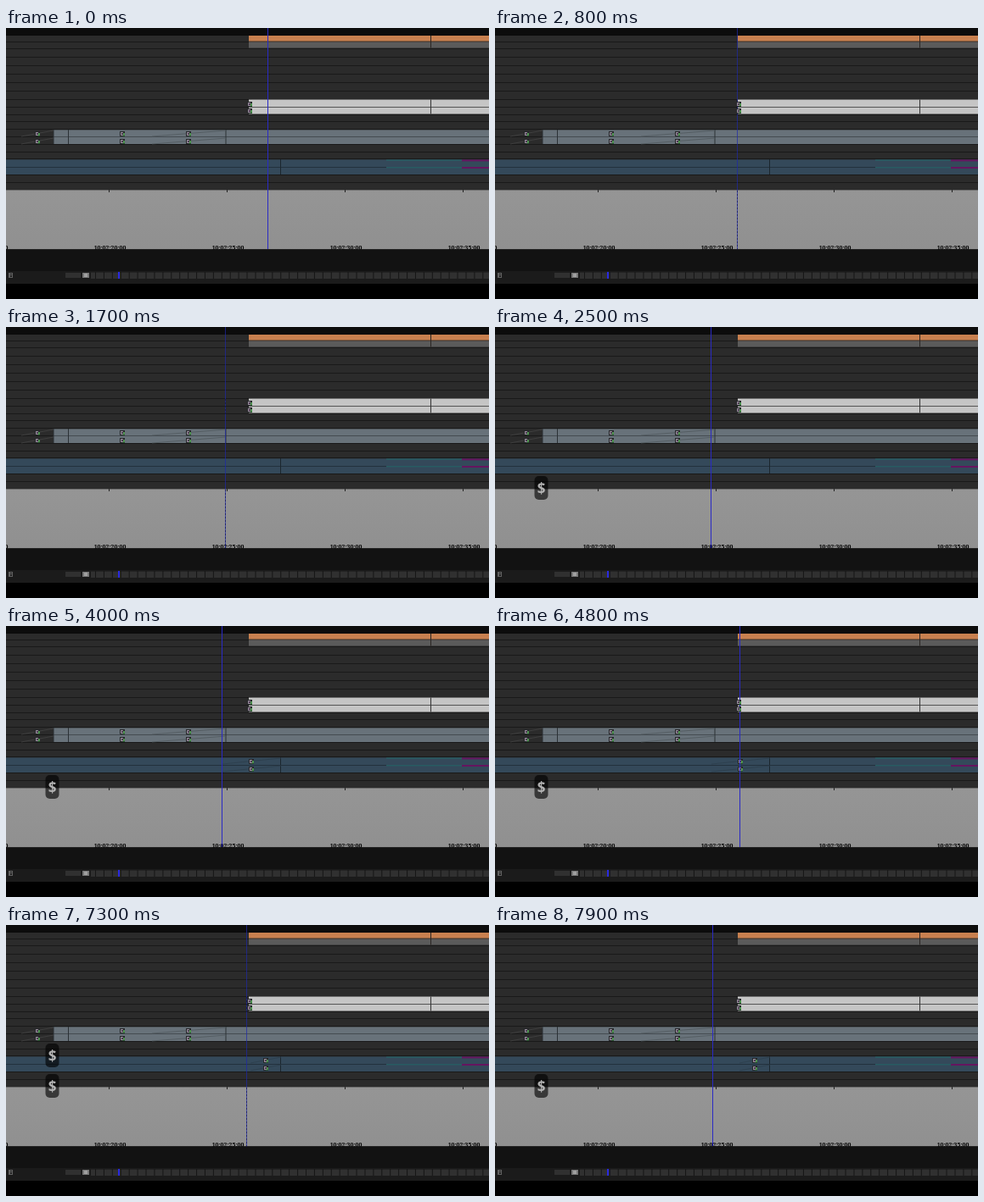
Animation, 569 px wide and 320 px high, one loop 8000 ms. Source, as an HTML page with a canvas:

```html
<!DOCTYPE html>
<html lang="en">
<head>
<meta charset="utf-8">
<title>Timeline</title>
<style>
html, body { margin: 0; width: 100%; height: 100%; overflow: hidden; background: #000; }
canvas { display: block; width: 569px; height: 320px; }
</style>
</head>
<body>
<canvas id="stage" width="569" height="320"></canvas>
<script>
const LOOP = 8000, W = 569, CUT = 324;
const ctx = document.getElementById('stage').getContext('2d');

function box(x, y, w, h, color) {
  ctx.fillStyle = color;
  ctx.fillRect(x, y, w, h);
}

const hline = (y, color, x = 0, w = W) => box(x, y, w, 1, color);
const vline = (x, y, h, color) => box(x, y, 1, h, color);
const clamp = v => Math.max(0, Math.min(1, v));
const ramp = (t, a, b) => clamp((t - a) / (b - a));
const easeOut = p => 1 - (1 - p) ** 3;

// [time, x] points of the playhead, joined linearly
const path = [[0, 308], [1850, 254], [4000, 254], [4800, 288], [7180, 288], [7950, 254], [8000, 254]];

function headX(t) {
  const i = path.findIndex((p, k) => k > 0 && t <= p[0]);
  const [t0, x0] = path[i - 1], [t1, x1] = path[i];
  return x0 + (x1 - x0) * (t - t0) / (t1 - t0);
}

function isMoving(t) {
  return (t > 60 && t < 1800) || (t > 4040 && t < 4750) || (t > 7200 && t < 7850);
}

function icon(x, y) {
  box(x - 3, y - 3, 6, 6, '#25272a');
  box(x - 2, y - 2, 3, 4, '#958a99');
  box(x - 1, y - 1, 2, 2, '#4d3e52');
  box(x + 1, y - 1, 2, 3, '#4b8f4d');
  box(x, y + 2, 3, 1, '#24482a');
}

function slope(x0, y0, x1, y1, color) {
  ctx.strokeStyle = color;
  ctx.lineWidth = 0.8;
  ctx.beginPath();
  ctx.moveTo(x0, y0);
  ctx.lineTo(x1, y1);
  ctx.stroke();
}

function dissolve(x0, x1, top, color) {
  const mid = Math.floor((x0 + x1) / 2);
  for (const y of [top, top + 9]) {
    slope(x0, y + 8, x1, y + 1, color);
    icon(mid, y + 5);
  }
}

function drawTracks() {
  box(0, 0, W, 192, '#2b2b2b');
  box(0, 0, W, 9, '#0c0c0c');
  const rows = [16, 24, 34, 44, 54, 64, 74, 84, 93, 102, 110, 119, 128, 137, 146, 154, 164, 173, 182];
  rows.forEach(y => hline(y, '#191919'));

  box(286, 9, 283, 7, '#c8804f');
  box(286, 16, 283, 7.5, '#5b5b5b');
  hline(15.5, '#3a2e27', 286);
  box(286, 84.5, 283, 17, '#c5c5c5');
  hline(93, '#555', 286);
  vline(500, 9, 14.5, '#2a2523');
  vline(500, 84.5, 17, '#333');

  box(56, 120.4, 513, 16.6, '#68727a');
  hline(128, '#444b51', 56);
  [55.5, 73, 258.5].forEach(x => vline(x, 120, 17, '#2b3135'));
  dissolve(18, 256, 120, 'rgba(0,0,0,0)');
}

function drawClips() {
  box(0, 155.4, W, 17.6, '#34495a');
  hline(164, '#23313d');
  vline(323, 155, 18, '#1b262e');
  for (const y of [155.4, 164]) {
    box(448, y, 89, 1.5, '#285c62');
    box(537, y, 32, 2, '#65155f');
  }
}

function drawRuler() {
  const g = ctx.createLinearGradient(0, 192, 0, 261);
  g.addColorStop(0, '#959595');
  g.addColorStop(1, '#909090');
  box(0, 191.4, W, 70, g);
  ctx.font = 'bold 7px "Noto Serif", serif';
  ctx.textAlign = 'center';
  ctx.textBaseline = 'alphabetic';
  for (let i = -1; i < 4; i++) {
    const x = 121 + 139 * i;
    vline(x, 191, 3, '#222');
    ctx.fillStyle = '#000';
    ctx.fillText(`10:02:${20 + 5 * i}:00`, x + 1.5, 261.5);
  }
}

function drawToolbar() {
  box(0, 261.3, W, 26, '#121212');
  box(0, 287, W, 15, '#1b1b1b');
  box(0, 302, W, 18, '#000');
  box(3, 289, 5, 6, '#606060');
  box(5, 290, 2, 1, '#222');
  box(5, 292, 2, 2, '#222');
  box(70, 289, 18, 6, '#303030');
  box(90, 289, 8, 6, '#777');
  box(92, 290, 4, 4, '#a0a0a0');
  box(100, 288, W - 100, 8, '#303030');
  hline(288, '#222', 100);
  for (let x = 105; x < W; x += 9.92) vline(x, 288, 8, '#161616');
  box(132, 288, 2, 8, '#2929e0');
}

function drawHead(t) {
  const x = Math.round(headX(t));
  const moving = isMoving(t);
  box(x, 0, 1, 261, moving ? 'rgba(30,40,170,.7)' : '#2a2ac4');
  if (!moving) return;
  ctx.fillStyle = 'rgba(16,18,70,.6)';
  for (const [top, end] of [[85, 102], [192, 261]]) {
    for (let y = top; y < end; y += 4) ctx.fillRect(x, y, 1, 2);
  }
}

function pill(y, alpha, scale) {
  if (alpha <= 0) return;
  ctx.save();
  ctx.globalAlpha = alpha;
  ctx.translate(54.5, y);
  ctx.scale(scale, scale);
  ctx.fillStyle = 'rgba(0,0,0,.62)';
  ctx.beginPath();
  ctx.roundRect(-8, -14, 16, 28, 5);
  ctx.fill();
  ctx.fillStyle = '#b2b2b2';
  ctx.font = 'bold 17px "Noto Sans", sans-serif';
  ctx.textAlign = 'center';
  ctx.fillText('$', 0, 6.5);
  ctx.restore();
}

function drawKeys(t) {
  const first = easeOut(ramp(t, 1750, 2200));
  const push = easeOut(ramp(t, 4900, 5200));
  pill(190 - 36 * push, first * (1 - ramp(t, 7400, 7600)), 1.9 - 0.9 * first);
  pill(190, push, 1);
}

function draw(t) {
  drawTracks();
  drawClips();
  dissolve(18, 56, 120, '#454545');
  dissolve(172, 259, 120, '#50585e');
  if (t >= 2900) dissolve(t < 5600 ? 255 : 288, CUT, 155, '#2c3e4c');
  drawRuler();
  drawToolbar();
  drawHead(t);
  for (const y of [90, 98]) icon(287, y);
  drawKeys(t);
}

const start = performance.now();
function frame() {
  draw((performance.now() - start) % LOOP);
  requestAnimationFrame(frame);
}
frame();
</script>
</body>
</html>
```
